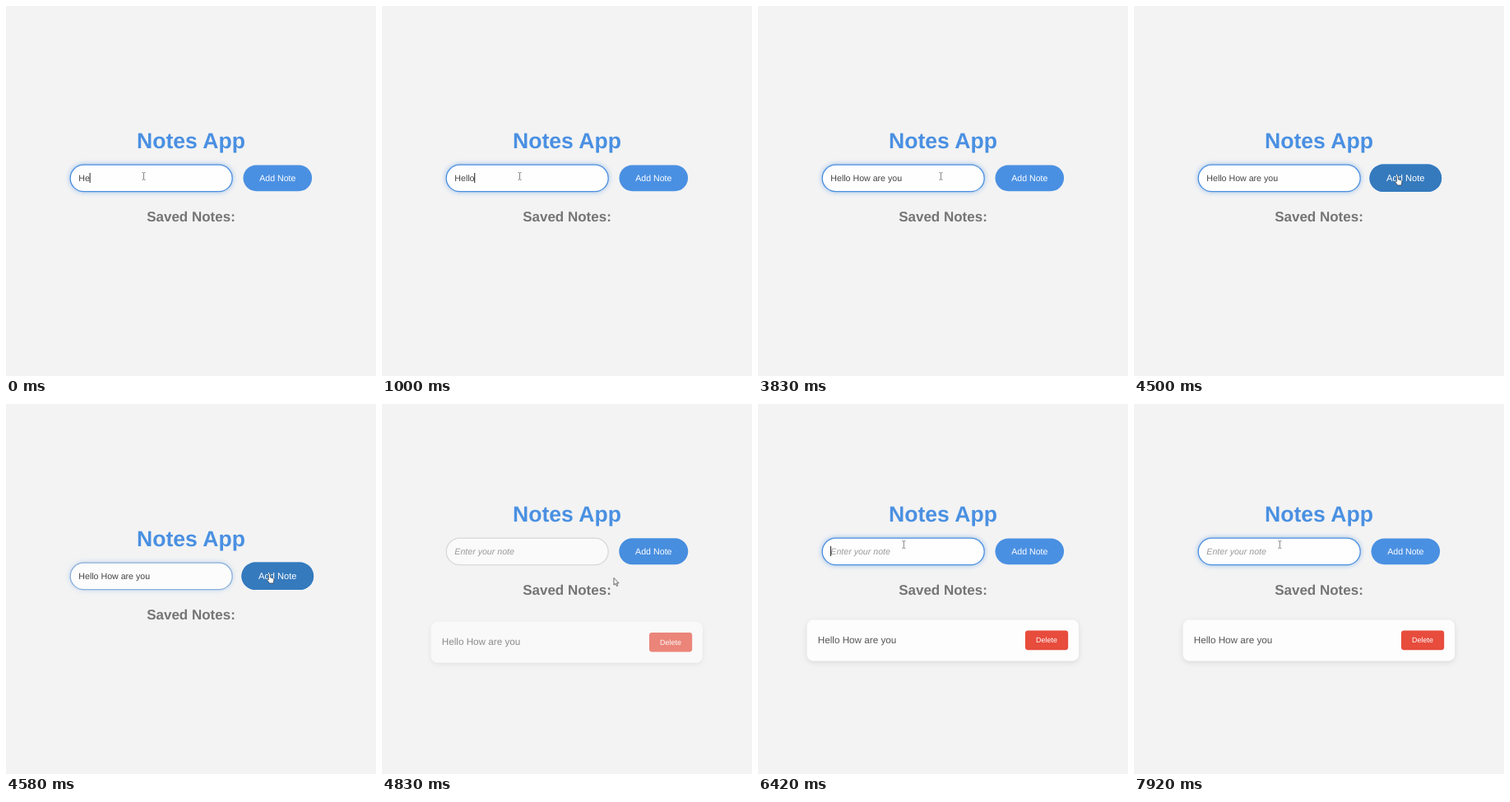
An HTML page that plays this animation: 450x450 px, repeating every 8 s.

```html
<!DOCTYPE html>
<html lang="en">
<head>
<meta charset="utf-8">
<title>Notes App</title>
<style>
  html, body { margin: 0; width: 100%; height: 100%; overflow: hidden; background: #f3f3f3; }
  svg { display: block; width: 450px; height: 450px; }
  text {
    font: 10.64px "Liberation Sans", Arial, sans-serif;
    white-space: pre;
    text-rendering: geometricPrecision;
  }
  .mid { text-anchor: middle; }
  .title { font-size: 26.6px; font-weight: bold; fill: #4a90e2; }
  .sub { font-size: 17px; font-weight: bold; fill: #757575; }
  .hint { font-style: italic; fill: #999; }
  .note { font-size: 11.7px; fill: #555; }
  .del { font-size: 9px; fill: #fff; }
  .card { filter: drop-shadow(0 2.6px 3.3px rgba(0, 0, 0, .1)); }
</style>
</head>
<body>
<svg viewBox="0 0 450 450">
  <defs>
    <filter id="blur" x="-20%" y="-60%" width="140%" height="220%">
      <feGaussianBlur stdDeviation="3"/>
    </filter>
  </defs>

  <g id="form">
    <text class="title mid" x="225" y="173">Notes App</text>

    <rect id="glow" x="77.6" y="192.6" width="198.2" height="33.6" rx="16.8" fill="#4a90e2" filter="url(#blur)"/>
    <rect x="78.2" y="193.2" width="197" height="32.4" rx="16.2" fill="#fafafa" stroke="#d8d8d8" stroke-width="1.3"/>
    <rect id="ring" x="78.2" y="193.2" width="197" height="32.4" rx="16.2" fill="#fefefe" stroke="#4a90e2" stroke-width="1.3"/>
    <text class="hint" id="hint" x="88.3" y="212.5">Enter your note</text>
    <text id="typed" x="88.3" y="212.5" fill="#444"></text>
    <rect id="caret" y="203" width="1" height="12" fill="#222"/>

    <g id="button">
      <rect x="288.5" y="193.4" width="83.6" height="31.8" rx="15.9" fill="#4a90e2"/>
      <rect id="dark" x="288.5" y="193.4" width="83.6" height="31.8" rx="15.9" fill="#357abd"/>
      <text class="mid" x="330.3" y="212.7" fill="#fff">Add Note</text>
    </g>

    <text class="sub mid" x="225" y="262">Saved Notes:</text>
  </g>

  <g id="card">
    <rect class="card" x="59.5" y="262.5" width="330.6" height="50" rx="8" fill="#fdfdfd"/>
    <text class="note" x="72.8" y="291">Hello How are you</text>
    <rect x="325" y="275.6" width="52.2" height="23.6" rx="3.4" fill="#e74c3c"/>
    <text class="del mid" x="351" y="290.4">Delete</text>
  </g>

  <g id="mouse" stroke-linejoin="round">
    <path id="beam" d="M-2 -4.5 Q0 -4.5 0 -3.4 Q0 -4.5 2 -4.5 M0 -3.4 V3.4 M-2 4.5 Q0 4.5 0 3.4 Q0 4.5 2 4.5" fill="none" stroke="#777" stroke-width=".9"/>
    <path id="arrow" d="M0 0 V8.6 L2 6.8 L3.4 10 L4.8 9.4 L3.4 6.3 H6 Z" fill="#fff" stroke="#444" stroke-width=".8"/>
    <path id="hand" d="M-1 0 Q0 -1.3 1 0 V4 L4.6 5 Q5.6 5.4 5.4 7 L4.6 11 H0 L-3 7 Q-3.3 5.4 -1 6.6 Z" fill="#fff" stroke="#345" stroke-width=".8"/>
  </g>
</svg>

<script>
const LOOP = 8000, HOVER = 4010, PRESS = 4500, CLICK = 4640, FOCUS = 5250;
const MESSAGE = "Hello How are you";
// Moment at which each character after "He" appears
const KEYS = [580, 750, 1000, 1170, 1420, 1750, 1830, 1920, 2080, 2330, 2500, 2580, 2830, 2920, 3080];
// Pointer stops: time, x, y
const STOPS = [[3580, 167.5, 207], [4200, 320.5, 207], [4600, 320.5, 207], [4830, 282, 211.5], [5290, 177.3, 171]];

const el = Object.fromEntries([...document.querySelectorAll("[id]")].map(e => [e.id, e]));
const set = (e, name, value) => e.setAttribute(name, value);
const show = (e, on) => set(e, "opacity", +on);
const clamp = x => Math.min(1, Math.max(0, x));
const smooth = x => x * x * (3 - 2 * x);

// The CSS "ease" curve, cubic-bezier(.25, .1, .25, 1)
function ease(x) {
  x = clamp(x);
  const curve = (s, a, b) => 3 * s * (1 - s) ** 2 * a + 3 * s * s * (1 - s) * b + s ** 3;
  let lo = 0, hi = 1;
  for (let i = 0; i < 20; i++) {
    const s = (lo + hi) / 2;
    if (curve(s, .25, .25) < x) lo = s; else hi = s;
  }
  return curve(lo, .1, 1);
}

const fade = (t, start, length = 300) => ease((t - start) / length);

function pointer(t) {
  let i = 0;
  while (i < STOPS.length - 2 && t > STOPS[i + 1][0]) i++;
  const [a, b] = [STOPS[i], STOPS[i + 1]];
  const k = smooth(clamp((t - a[0]) / (b[0] - a[0])));
  return [a[1] + (b[1] - a[1]) * k, a[2] + (b[2] - a[2]) * k];
}

function caretOn(t) {
  if (t >= PRESS) return t >= FOCUS && (t < 5285 || Math.floor((t - 5285) / 520) % 2 === 0);
  if (t < KEYS[0]) return t < 170;
  const last = KEYS.filter(k => k <= t).pop();
  return (t - last) % 1000 < 500;
}

function draw(t) {
  const added = t >= CLICK;
  const lift = added ? -30 : 0;
  set(el.form, "transform", `translate(0 ${lift})`);

  const focus = t < FOCUS ? 1 - fade(t, PRESS) : fade(t, FOCUS);
  set(el.glow, "opacity", focus * .55);
  set(el.ring, "opacity", focus);

  el.typed.textContent = added ? "" : MESSAGE.slice(0, 2 + KEYS.filter(k => k <= t).length);
  show(el.hint, added);
  set(el.caret, "x", 88 + (added ? 0 : el.typed.getComputedTextLength()));
  show(el.caret, caretOn(t));

  const hover = added ? 1 - fade(t, CLICK) : fade(t, HOVER);
  set(el.dark, "opacity", hover);
  set(el.button, "transform", `translate(330.3 209.3) scale(${1 + .05 * hover}) translate(-330.3 -209.3)`);

  const enter = fade(t, CLICK, 500);
  set(el.card, "opacity", enter);
  set(el.card, "transform", `translate(0 ${6.65 * (1 - enter)})`);

  const [x, y] = pointer(t);
  const inInput = x < 276 && y < 226 + lift;
  const onButton = !added && x > 288.5;
  set(el.mouse, "transform", `translate(${x} ${y})`);
  show(el.beam, inInput);
  show(el.hand, onButton);
  show(el.arrow, !inInput && !onButton);
}

const start = performance.now();
function tick() {
  draw((performance.now() - start) % LOOP);
  requestAnimationFrame(tick);
}
tick();
</script>
</body>
</html>
```
